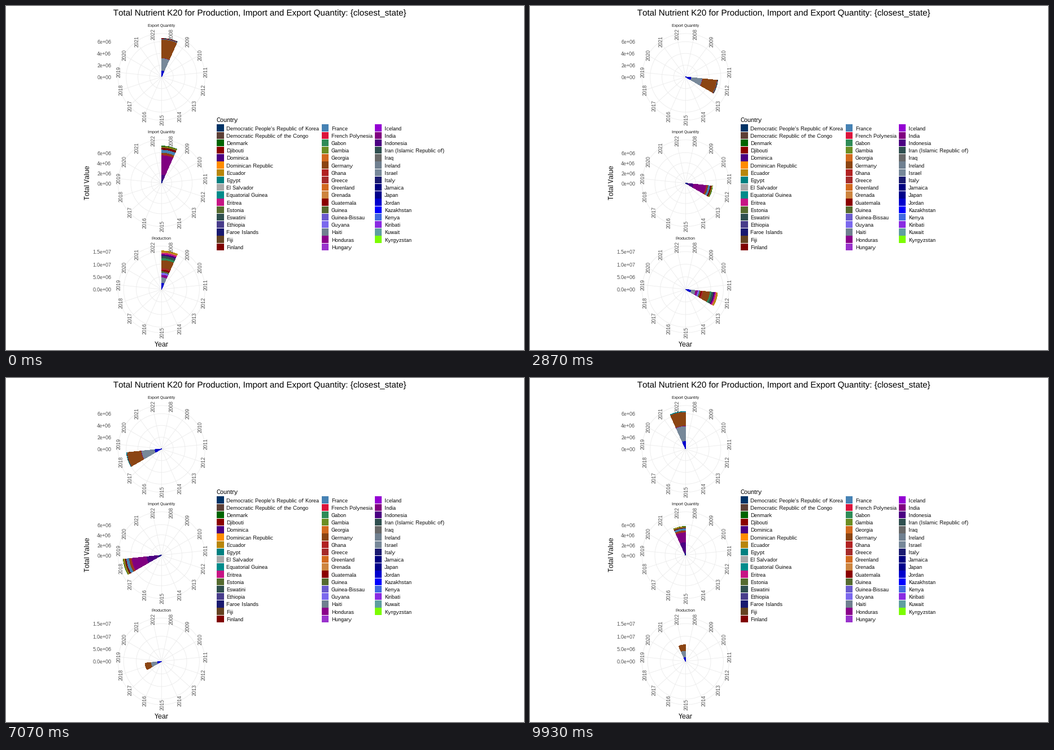
A matplotlib script that plays this animation: 917x611 px, repeating every 10 s.

```python
import numpy as np
import matplotlib.pyplot as plt
from matplotlib.animation import FuncAnimation
from matplotlib.collections import LineCollection, PolyCollection
from matplotlib.patches import PathPatch
from matplotlib.textpath import TextPath
from matplotlib.transforms import IdentityTransform

W, H = 917, 611
LOOP, STEP = 10000, 50
YEARS = range(2008, 2023)
N = len(YEARS)
CX, RIM = 275.3, 77
PT = 0.722  # points per pixel, a touch over so hinted text keeps whole sizes

COUNTRIES = {
    "Democratic People's Republic of Korea": "#003366",
    "Democratic Republic of the Congo": "#5D4037",
    "Denmark": "darkgreen", "Djibouti": "darkred", "Dominica": "indigo",
    "Dominican Republic": "darkorange", "Ecuador": "darkgoldenrod",
    "Egypt": "teal", "El Salvador": "darkgray",
    "Equatorial Guinea": "darkcyan", "Eritrea": "mediumvioletred",
    "Estonia": "darkolivegreen", "Eswatini": "darkslategray",
    "Ethiopia": "darkslateblue", "Faroe Islands": "midnightblue",
    "Fiji": "#654321", "Finland": "maroon", "France": "steelblue",
    "French Polynesia": "crimson", "Gabon": "seagreen",
    "Gambia": "olivedrab", "Georgia": "chocolate",
    "Germany": "saddlebrown", "Ghana": "firebrick", "Greece": "brown",
    "Greenland": "chocolate", "Grenada": "peru", "Guatemala": "darkred",
    "Guinea": "darkolivegreen", "Guinea-Bissau": "slateblue",
    "Guyana": "mediumslateblue", "Haiti": "slategray",
    "Honduras": "darkmagenta", "Hungary": "darkorchid",
    "Iceland": "darkviolet", "India": "purple", "Indonesia": "indigo",
    "Iran (Islamic Republic of)": "darkslategray", "Iraq": "dimgray",
    "Ireland": "slategray", "Israel": "lightslategray",
    "Italy": "midnightblue", "Jamaica": "navy", "Japan": "darkblue",
    "Jordan": "mediumblue", "Kazakhstan": "blue", "Kenya": "royalblue",
    "Kiribati": "blueviolet", "Kuwait": "cadetblue",
    "Kyrgyzstan": "lawngreen",
}

# total: bar length in px at a few years, straight lines between.
# layers: weights from the centre outwards, before and after the drift years.
PANELS = [
    dict(name="Export Quantity", cy=125.9, ring=20.85, tick=2e6, fmt=".0e",
         total={0: 68.4, 1: 34, 2: 57.5, 6: 57, 8: 46.6, 9: 60, 12: 67,
                14: 66.5},
         drift=(0, 14),
         layers=dict(Jordan=(15, 20), Israel=(32, 40), India=(.5, 1),
                     Germany=(48, 37), France=(1.5, .5), Finland=(2, 0),
                     Egypt=(.5, 2))),
    dict(name="Import Quantity", cy=314.7, ring=18.1, tick=2e6, fmt=".0e",
         total={0: 66, 1: 36, 2: 54, 4: 48, 6: 62, 8: 57, 9: 68.4, 13: 67.5,
                14: 51},
         drift=(0, 14),
         layers=dict(Japan=(6, 5), Italy=(3, 2), Indonesia=(13, 37),
                     India=(52, 34), Greece=(3, 4), Germany=(4, 3),
                     France=(8, 7), Finland=(5, 2), Estonia=(2, 2),
                     Ecuador=(2, 3), Denmark=(2, 1))),
    dict(name="Production", cy=503.3, ring=22.35, tick=5e6, fmt=".1e",
         total={0: 68.4, 1: 37, 2: 58, 3: 62, 4: 57, 5: 35, 6: 29.2,
                14: 29.5},
         drift=(4, 6),
         layers=dict(Jordan=(16, 24), Israel=(14, 38), Honduras=(7, 0),
                     Guyana=(5, 0), Guinea=(4, 0), Guatemala=(4, 0),
                     Greece=(4, 0), Germany=(21, 38), Gabon=(5, 0),
                     Eswatini=(6, 0), Dominica=(4, 0), Eritrea=(4, 0),
                     Grenada=(2, 0), Ecuador=(4, 0))),
]

plt.rcParams.update({"font.family": "Liberation Sans",
                     "text.hinting": "no_autohint",
                     "text.hinting_factor": 1,
                     "text.kerning_factor": 6})
fig = plt.figure(figsize=(W / 100, H / 100), dpi=100, facecolor="white")
ax = fig.add_axes([0, 0, 1, 1])
ax.set(xlim=(0, W), ylim=(H, 0))
ax.axis("off")


def label(x, y, s, size, color="black", ha="left", upright=False):
    """Text whose capitals are centred across its reading direction on (x, y)."""
    drop = 0.358 * size
    dx, dy = (drop, 0) if upright else (0, drop)
    ax.text(x + dx, y + dy, s, fontsize=size * PT, color=color, ha=ha,
            va="baseline", rotation=90 if upright else 0,
            rotation_mode="anchor", zorder=4)


def polar(cy, r, deg):
    a = np.radians(deg)
    return np.column_stack([CX + r * np.sin(a), cy - r * np.cos(a)])


def sector(cy, r, k):
    arc = polar(cy, r, np.linspace(k, k + 1, 25) * 360 / N)
    return np.vstack([[CX, cy], arc])


def outer_edges(panel, k):
    total = np.interp(k, list(panel["total"]), list(panel["total"].values()))
    before, after = np.array(list(panel["layers"].values())).T
    mix = np.interp(k, panel["drift"], (0, 1))
    stack = np.cumsum(before + (after - before) * mix)
    return total * stack / stack[-1]


def slices(k):
    """Sectors of year k, largest first so that inner layers cover outer ones."""
    return [sector(p["cy"], r, k)
            for p in PANELS for r in outer_edges(p, k)[::-1]]


# Panels
grid = []
for p in PANELS:
    cy = p["cy"]
    for r in [p["ring"] * i for i in (1, 2, 3)] + [RIM]:
        grid.append(polar(cy, r, np.linspace(0, 360, 121)))
    for i, year in enumerate(YEARS):
        tip = polar(cy, RIM, [(i + 0.5) * 360 / N])[0]
        grid.append([(CX, cy), tip])
        label(tip[0] + 1, tip[1] - 0.4, str(year), 9, "#4D4D4D", "center",
              True)
    for i in range(4):
        label(186.2, cy + 0.9 - i * p["ring"], format(i * p["tick"], p["fmt"]),
              9, "#4D4D4D", "right")
    label(CX - 0.2, cy - 91.1, p["name"], 7, "#1A1A1A", "center")
ax.add_collection(LineCollection(grid, colors="#EBEBEB", linewidths=0.6,
                                 zorder=1), autolim=False)

# Titles
title = TextPath((189.8, H - 17), "Total Nutrient K20 for Production, Import "
                 "and Export Quantity: {closest_state}", size=15.2)
ax.add_patch(PathPatch(title, facecolor="black", linewidth=0,
                       transform=IdentityTransform()))
label(143.7, 313.5, "Total Value", 12, ha="center", upright=True)
label(275, 600.7, "Year", 12, ha="center")

# Legend
label(372.8, 201.8, "Country", 11)
keys = []
for i, name in enumerate(COUNTRIES):
    col, row = divmod(i, 17)
    x, y, s = (373, 558.8, 652.8)[col], 216.6 + 13.2 * row, 6.2
    cx = x + 6.4
    keys.append([(cx - s, y - s), (cx + s, y - s),
                 (cx + s, y + s), (cx - s, y + s)])
    label(x + 17.1, y + 0.7, name, 9)
ax.add_collection(PolyCollection(keys, facecolors=list(COUNTRIES.values()),
                                 linewidths=0, antialiased=False),
                  autolim=False)

fills = [COUNTRIES[c] for p in PANELS for c in reversed(p["layers"])]
bars = PolyCollection(slices(0), facecolors=fills, linewidths=0,
                      antialiased=False, zorder=2)
ax.add_collection(bars, autolim=False)

# The years are spread evenly over 150 ticks of the loop
starts = np.floor(np.arange(N) * 149 / (N - 1) + 0.5) * LOOP / 150


def update(frame):
    k = int(np.sum(starts < (frame + 1) * STEP)) - 1
    bars.set_verts(slices(k))
    return [bars]


anim = FuncAnimation(fig, update, frames=LOOP // STEP, interval=STEP,
                     repeat=True, repeat_delay=0, blit=False)
plt.show()
```
